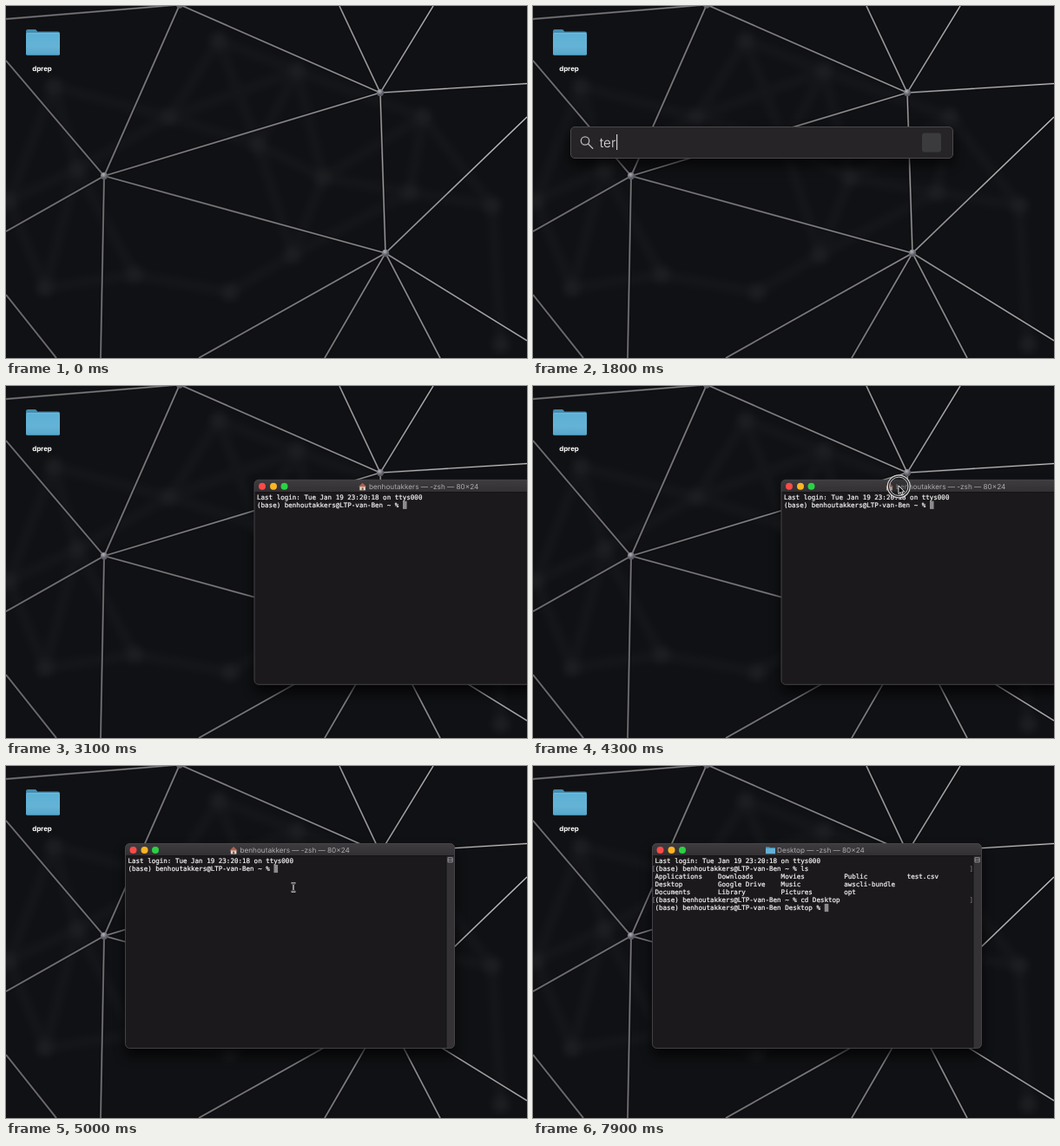
Animation of 600x406 px, one loop 8 s. Source, as an HTML page:

```html
<!DOCTYPE html>
<html lang="en">
<head>
<meta charset="utf-8">
<title>Opening a terminal</title>
<style>
  html, body { margin: 0; width: 100%; height: 100%; overflow: hidden; background: #101114; }
  svg { display: block; width: 100vw; height: 100vh; }
  text { white-space: pre; text-rendering: geometricPrecision; font-family: Inter, "Open Sans", sans-serif; }
  .mono text { font: 7.54px "DejaVu Sans Mono", "Liberation Mono", monospace; fill: #f2f2f2; stroke: #f2f2f2; stroke-width: .22px; }
  .mono .mark { fill: #8c8a8d; stroke: none; }
</style>
</head>
<body>
<svg viewBox="0 0 600 406" xmlns="http://www.w3.org/2000/svg">
  <defs>
    <linearGradient id="wire" gradientUnits="userSpaceOnUse" x1="0" y1="300" x2="560" y2="40">
      <stop offset="0" stop-color="#505054"/>
      <stop offset=".6" stop-color="#4a4a4e"/>
      <stop offset="1" stop-color="#3a3a3d"/>
    </linearGradient>
    <linearGradient id="shine" gradientUnits="userSpaceOnUse" x1="0" y1="300" x2="560" y2="40">
      <stop offset="0" stop-color="#6c6c71"/>
      <stop offset=".55" stop-color="#848488"/>
      <stop offset="1" stop-color="#c6c6c8"/>
    </linearGradient>
    <linearGradient id="folder" x2="0" y2="1">
      <stop offset="0" stop-color="#5cb0d4"/>
      <stop offset=".6" stop-color="#64b3d6"/>
      <stop offset="1" stop-color="#58a5c9"/>
    </linearGradient>
    <linearGradient id="bar" x2="0" y2="1">
      <stop offset="0" stop-color="#3e3c3f"/>
      <stop offset="1" stop-color="#323033"/>
    </linearGradient>
    <radialGradient id="joint" cx=".4" cy=".3">
      <stop offset="0" stop-color="#b4b4bb"/>
      <stop offset="1" stop-color="#5c5c65"/>
    </radialGradient>
    <filter id="haze" color-interpolation-filters="sRGB" filterUnits="userSpaceOnUse" x="-30" y="-30" width="660" height="466"><feGaussianBlur stdDeviation="4.500"/></filter>
    <filter id="shade" x="-20%" y="-60%" width="140%" height="240%"><feGaussianBlur stdDeviation="7"/></filter>
  </defs>

  <rect width="600" height="406" fill="#101114"/>
  <g id="far" filter="url(#haze)" opacity=".05"></g>
  <g id="wires" fill="none"></g>
  <g id="joints" fill="url(#joint)"></g>

  <path d="M23 56V29q0-2 2-2h8.500q1 0 1.800 1.200l1 1.300H60q2 0 2 2V55z" fill="#458bad"/>
  <rect x="23" y="31" width="39" height="26" rx="1.800" fill="url(#folder)"/>
  <path d="M24 31.400H61" stroke="#7fc5e2" stroke-width=".7"/>
  <path d="M24 56.600H61" stroke="#3d82a3" stroke-width=".8"/>
  <text x="41.500" y="75" text-anchor="middle" font-size="7.900" font-weight="700" fill="#fff">dprep</text>

  <g id="search">
    <rect x="43" y="145" width="441" height="38" rx="5" opacity=".65" filter="url(#shade)"/>
    <rect x="43.500" y="139.500" width="440" height="36" rx="4.500" fill="#262427" stroke="#4a484b"/>
    <g fill="none" stroke="#b9b8ba" stroke-width="1.300" stroke-linecap="round">
      <circle cx="60" cy="155.500" r="4.700"/><path d="M63.500 159L68.800 164.200"/>
    </g>
    <text id="query" x="76.700" y="163.300" font-size="15.200" font-weight="300"></text>
    <rect id="caret" y="148" width="1" height="18" fill="#f0f0f0"/>
    <rect id="hit" x="448" y="146.500" width="22" height="22" rx="3" fill="#3b3a3d"/>
  </g>

  <g id="win">
    <rect y="7" width="379" height="238" rx="5" opacity=".7" filter="url(#shade)"/>
    <rect width="379" height="236" rx="5" fill="#1c191c"/>
    <path d="M0 14V5Q0 0 5 0H374Q379 0 379 5V14z" fill="url(#bar)"/>
    <path d="M369.500 14H379V231Q379 236 374 236H369.500z" fill="#343235"/>
    <path d="M0 14.200H379M369.500 14V236" stroke="#111012" stroke-width=".8"/>
    <rect width="379" height="236" rx="5" fill="none" stroke="#4a484c" stroke-width=".9"/>
    <path d="M371.500 16.300h5.200v5h-5.200zM371.500 18.800h5.200" fill="none" stroke="#a9a7ab" stroke-width=".8"/>
    <circle cx="9" cy="7.500" r="4" fill="#fb4a48"/>
    <circle cx="22" cy="7.500" r="4" fill="#fdb424"/>
    <circle cx="34.500" cy="7.500" r="4" fill="#2bd145"/>
    <g id="house">
      <path d="M121.300 7.500h6.600V12h-6.600z" fill="#dcd6cc"/>
      <path d="M120 8L124.600 3.500L129.200 8z" fill="#b3604c"/>
      <path d="M123.700 9h1.900v3h-1.900z" fill="#77594a"/>
    </g>
    <g id="dir">
      <path d="M130.500 11.500V3.700h4l1 1h6v6.800z" fill="#458bad"/>
      <rect x="130.500" y="5.300" width="11" height="6.500" rx=".6" fill="#62b1d5"/>
    </g>
    <text id="title" y="10.400" font-size="8.200" fill="#adabae"></text>
    <rect id="block" width="4.600" height="9.200" fill="#8d8b8e"/>
    <g id="rows" class="mono"></g>
  </g>

  <g id="ring" fill="none">
    <circle r="12" fill="#222023" fill-opacity=".3"/>
    <circle r="12.100" stroke="#232124" stroke-width="2.400"/>
    <circle r="13" stroke="#d9d9d9" stroke-width="1.200"/>
    <circle r="10.700" stroke="#c9c9c9" stroke-width="1"/>
  </g>
  <path id="arrow" d="M0 0V9.500L2.200 7.500L3.700 11L5.300 10.300L3.800 7H6.800z" fill="#000" stroke="#fff" stroke-width=".9"/>
  <g id="beam" fill="none">
    <path id="beamBack" stroke="#e6e6e6" stroke-width="2"/>
    <path id="beamCore" stroke="#111" stroke-width=".8"/>
  </g>
</svg>
<script>
const LOOP = 8000, STEP = 100;
const CHAR = 4.54, ROW = 9, LEFT = 3, BASE = 22.4;
const USER = 'benhoutakkers';
const PROMPT = `(base) ${USER}@LTP-van-Ben `;
const LOGIN = 'Last login: Tue Jan 19 23:20:18 on ttys000';
const FILES = [
  ['Applications', 'Downloads', 'Movies', 'Public', 'test.csv'],
  ['Desktop', 'Google Drive', 'Music', 'awscli-bundle'],
  ['Documents', 'Library', 'Pictures', 'opt']
].map(names => names.map(n => n.padEnd(16)).join('').trimEnd());

const $ = id => document.getElementById(id);
const show = (id, on) => $(id).style.display = on ? '' : 'none';
const move = (id, x, y) => $(id).setAttribute('transform', `translate(${x} ${y})`);
const clamp = v => Math.max(0, Math.min(1, v));
const smooth = v => (v = clamp(v), v * v * (3 - 2 * v));
const mix = (a, b, p) => a + (b - a) * p;

// The latest entry whose time has come.
const latest = (steps, t) => steps.reduce((cur, [at, v]) => t >= at ? v : cur, '');

function drawWallpaper() {
  const hubs = [
    [200, -1.5, [[0, 15], [113, 196], [431, 100]]],
    [431, 100, [[384, 0], [492, 0], [600, 89.5], [113, 196], [437, 285]]],
    [437, 285, [[113, 196], [600, 128], [600, 386], [500, 406], [367, 406], [222, 406]]],
    [113, 196, [[0, 63], [0, 260], [109, 406]]],
    [0, 333, [[58, 406]]]
  ];
  const d = hubs.map(([x, y, ends]) => ends.map(e => `M${x} ${y}L${e}`).join('')).join('');
  const layers = [['#09090b', 4], ['url(#wire)', 2.3], ['url(#shine)', 1.1]];
  $('wires').innerHTML = layers
    .map(([color, width]) => `<path d="${d}" stroke="${color}" stroke-width="${width}"/>`).join('');
  $('joints').innerHTML = hubs.slice(0, 4)
    .map(([x, y]) => `<circle cx="${x}" cy="${y}" r="4.2"/>`).join('');

  const dots = [[245, 40], [335, 75], [188, 128], [55, 93], [290, 160], [365, 198], [330, 287],
    [258, 330], [148, 310], [45, 325], [480, 128], [560, 230], [465, 215], [570, 390], [82, 188], [3, 225]];
  let links = '';
  dots.forEach((a, i) => dots.slice(i + 1).forEach(b => {
    if (Math.hypot(a[0] - b[0], a[1] - b[1]) < 165) links += `M${a}L${b}`;
  }));
  $('far').innerHTML = `<path d="${links}" stroke="#fff" stroke-opacity=".4" stroke-width="12"/>` +
    dots.map(([x, y]) => `<circle cx="${x}" cy="${y}" r="10" fill="#fff"/>`).join('');
}

function drawSearch(t) {
  show('search', t >= 900 && t < 2300);
  const typed = latest([[1500, 't'], [1700, 'te'], [1800, 'ter'], [1900, 'term']], t);
  const query = $('query');
  query.textContent = typed || 'Glintfind Search';
  query.setAttribute('fill', typed ? '#e4e3e5' : '#77757a');
  $('caret').setAttribute('x', typed ? 77.5 + query.getComputedTextLength() : 76.2);
  show('hit', typed);
}

// Rows of text, rows with brackets, and whether the block cursor shows.
function session(t) {
  const home = PROMPT + '~ % ';
  if (t < 3000) return { rows: [''], marks: [], block: true };
  if (t < 3100) return { rows: [LOGIN, ''], marks: [], block: true };
  const list = latest([[5800, 'l'], [5900, 'ls']], t);
  const rows = [LOGIN, home + list], marks = [];
  let block = t < 6000 || t >= 6100;
  if (t >= 6000) marks.push(1);
  if (t >= 6100) {
    rows.push(...FILES, home + latest([[6400, 'c'], [6600, 'cd'], [6800, 'cd '], [6900, 'cd D'],
      [7000, 'cd De'], [7100, 'cd Des'], [7200, 'cd Desktop/'], [7400, 'cd Desktop']], t));
  }
  if (t >= 7400) {
    marks.push(5);
    block = t < 7500 || t >= 7700;
  }
  if (t >= 7700) rows.push(PROMPT + 'Desktop % ');
  return { rows, marks, block };
}

function drawWindow(t, x, y) {
  show('win', t >= 2500);
  const grow = clamp((t - 2400) / 300);
  const size = mix(.8, 1, smooth(grow));
  $('win').setAttribute('opacity', grow);
  $('win').setAttribute('transform',
    `translate(${x + 189.5 * (1 - size)} ${y + 118 * (1 - size)}) scale(${size})`);

  const moved = t >= 7800;
  show('house', !moved);
  show('dir', moved);
  $('title').textContent = `${moved ? 'Desktop' : USER} — -zsh — 80×24`;
  $('title').setAttribute('x', moved ? 143.5 : 132);

  const { rows, marks, block } = session(t);
  const line = (s, px, row, cls = '') => `<text class="${cls}" x="${px}" y="${BASE + row * ROW}">${s}</text>`;
  $('rows').innerHTML = rows.map((s, i) => line(s, LEFT, i)).join('') +
    marks.map(i => line('[', -.8, i, 'mark') + line(']', 365, i, 'mark')).join('');
  const last = rows.length - 1;
  move('block', LEFT + rows[last].length * CHAR, 15.4 + last * ROW);
  show('block', block);
}

function drawPointer(t, dx, dy) {
  const reach = smooth((t - 3400) / 800);
  const leave = smooth((t - 4800) / 200);
  const x = mix(mix(558, 421, reach) + dx, 331, leave);
  const y = mix(mix(330, 115, reach) + dy, 140, leave);
  show('arrow', t >= 3500 && t < 5000);
  show('ring', t >= 4200 && t < 4800);
  show('beam', t >= 5000 && t < 5800);
  move('arrow', x, y);
  move('ring', x + .3, y + .8);
  move('beam', x, y);
}

function draw(now) {
  const t = Math.floor(now % LOOP / STEP) * STEP;
  const drag = smooth((t - 4300) / 400);
  const dx = -148.5 * drag, dy = -18.8 * drag;
  drawSearch(t);
  drawWindow(t, 286 + dx, 108.3 + dy);
  drawPointer(t, dx, dy);
}

const beam = 'M-2.400 -5Q0 -5 0 -3.200Q0 -5 2.400 -5M0 -4V4M-2.400 5Q0 5 0 3.200Q0 5 2.400 5';
['beamBack', 'beamCore'].forEach(id => $(id).setAttribute('d', beam));
drawWallpaper();

const start = performance.now();
function tick() {
  draw(performance.now() - start);
  requestAnimationFrame(tick);
}
tick();
</script>
</body>
</html>
```
